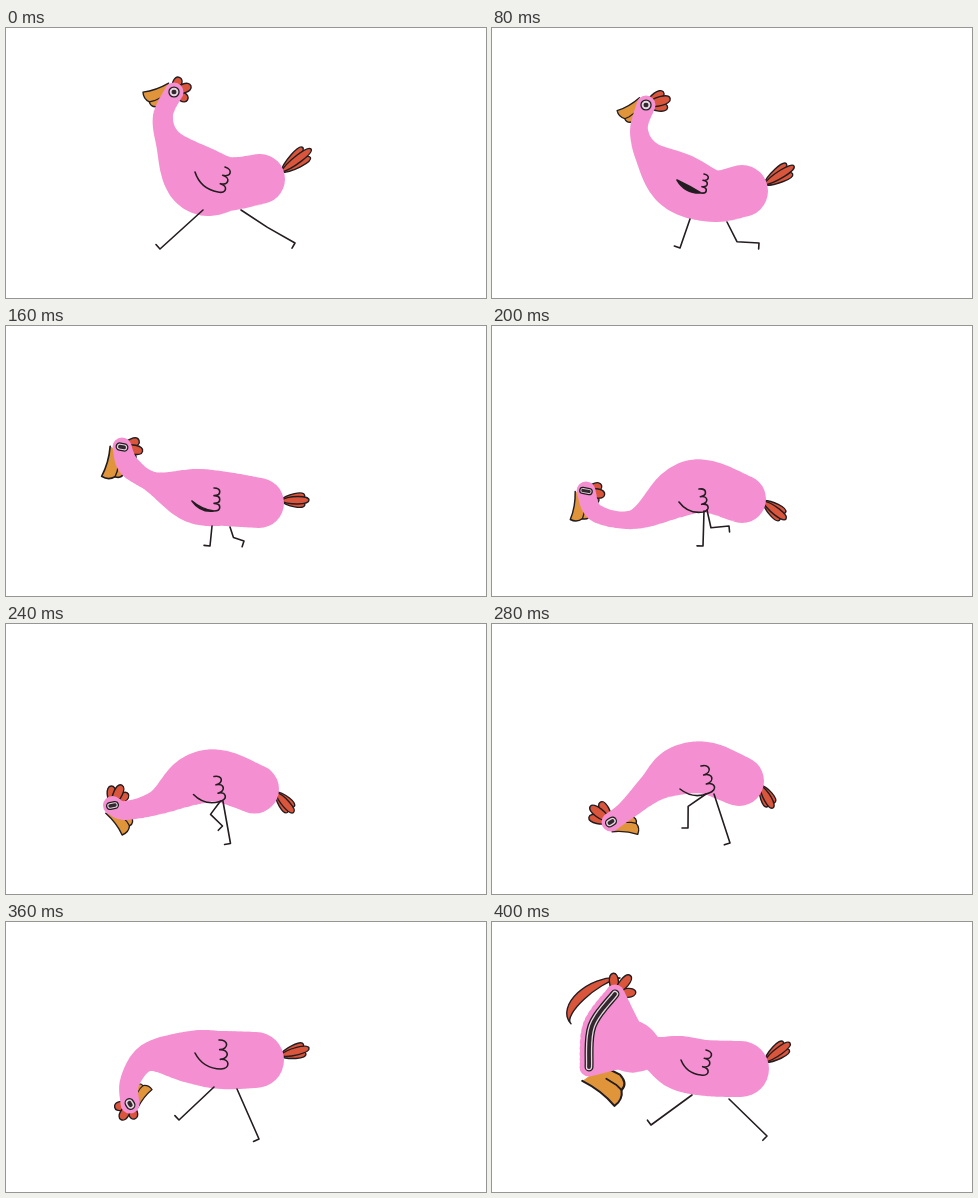
Recreate the animation shown at these times as an HTML page with a canvas. Size 480x270 px, loop 440 ms.

```html
<!DOCTYPE html>
<html lang="en">
<head>
<meta charset="utf-8">
<title>Running bird</title>
<style>
  html, body { margin: 0; width: 100%; height: 100%; overflow: hidden; background: #fff; }
  canvas { display: block; width: 100vw; height: 100vh; }
</style>
</head>
<body>
<canvas id="stage" width="480" height="270"></canvas>
<script>
const ctx = document.getElementById('stage').getContext('2d');
const STEP = 40, STEPS = 11, HEAD_RADIUS = 9.5;
const INK = '#231c20', PINK = '#f490d1', RED = '#d9553b', ORANGE = '#e0953b';

// Key poses of the rig, placed on a step of the cycle:
//   face  x, y of the head (a curve of points when it is smeared)
//   spine x, y, radius from neck to rump      beak  turn, size
//   comb  angle, length, spread               eye   squint, tilt
//   tail  x, y of the tip                     wing  start, bottom, top, blade
//   legs  hip, foot and knee bend, twice      (angles in degrees)
const keys = [
  { at: 0, face: [168, 64], spine: [157, 88, 10, 164, 115, 14, 193, 151, 33, 222, 156, 27, 254, 151, 25],
    beak: [2, 1], comb: [-20, 18, 50], eye: [0, 0], tail: [305, 121], wing: [189, 144, 212, 164, 219, 139, 0],
    legs: [197, 182, 154, 221, 0, 235, 182, 289, 215, 1] },
  { at: 2, face: [154, 77], spine: [147, 102, 9, 157, 127, 14, 187, 154, 29, 221, 168, 26, 250, 163, 26],
    beak: [13, 0.95], comb: [-15, 25, 22], eye: [0, 0], tail: [302, 138], wing: [185, 152, 209, 165, 212, 146, 5],
    legs: [198, 191, 188, 220, 0, 235, 194, 267, 215, 11] },
  { at: 4, face: [116, 121], spine: [123, 140, 11, 148, 157, 11, 189, 170, 27, 220, 173, 27, 253, 177, 25],
    beak: [57, 1.15], comb: [12, 21, 33], eye: [2, 10], tail: [303, 174], wing: [186, 175, 208, 185, 208, 162, 2],
    legs: [206, 200, 204, 220, 0, 224, 201, 238, 215, 5] },
  { at: 5, face: [94, 165], spine: [104, 187, 9, 143, 193, 10, 187, 166, 25, 213, 160, 26, 250, 173, 24],
    beak: [63, 1.05], comb: [12, 19, 32], eye: [3, 10], tail: [294, 193], wing: [187, 176, 211, 186, 207, 163, 0],
    legs: [212, 185, 211, 220, 0, 215, 184, 237, 200, 12] },
  { at: 7, face: [119, 198], spine: [135, 186, 10, 161, 163, 15, 186, 147, 24, 214, 144, 26, 247, 157, 25],
    beak: [157, 0.95], comb: [-143, 26, 25], eye: [1.5, -32], tail: [281, 184], wing: [188, 165, 217, 169, 209, 142, 0],
    legs: [222, 170, 238, 219, 0, 214, 170, 196, 204, 10] },
  { at: 9, face: [124, 182], spine: [124, 159, 10, 143, 135, 14, 185, 135, 26, 215, 138, 29, 250, 138, 28],
    beak: [215, 0.85], comb: [-240, 18, 48], eye: [1, 60], tail: [303, 126], wing: [189, 131, 215, 147, 213, 118, 0],
    legs: [231, 167, 253, 217, 0, 208, 165, 173, 198, 0] },
  { at: 10, face: [123, 72, 100, 104, 97, 145], spine: [133, 122, 24, 160, 131, 17, 188, 141, 27, 214, 146, 28, 249, 147, 28],
    beak: [125, 1.5], comb: [-50, 24, 45], eye: [0, 0], tail: [298, 121], wing: [189, 138, 209, 153, 214, 128, 0],
    legs: [237, 177, 275, 214, 0, 200, 173, 159, 203, 0] }
];

const rad = degrees => degrees * Math.PI / 180;
const mix = (a, b, k) => a.map((v, i) => v + (b[i] - v) * k);

function poseAt(step) {
  const next = keys.findIndex(key => key.at >= step);
  const b = keys[next];
  if (b.at === step) return b;
  const a = keys[next - 1], pose = {};
  for (const part in a) {
    if (part !== 'at') pose[part] = mix(a[part], b[part], (step - a.at) / (b.at - a.at));
  }
  return pose;
}

function groups(list, size) {
  return Array.from({ length: list.length / size }, (_, i) => list.slice(i * size, (i + 1) * size));
}

// Smooth curve through points of any dimension.
function curve(points, perSpan) {
  if (points.length < 2) return points;
  const at = i => points[Math.max(0, Math.min(points.length - 1, i))];
  const out = [];
  for (let n = 0; n <= (points.length - 1) * perSpan; n++) {
    const i = Math.min(points.length - 2, Math.floor(n / perSpan)), t = n / perSpan - i;
    const [a, b, c, d] = [at(i - 1), at(i), at(i + 1), at(i + 2)];
    out.push(b.map((v, k) => v + t / 2 * (c[k] - a[k] + t * (2 * a[k] - 5 * v + 4 * c[k] - d[k]
      + t * (3 * v - a[k] - 3 * c[k] + d[k])))));
  }
  return out;
}

function stroke(width, color = INK) {
  ctx.lineWidth = width;
  ctx.strokeStyle = color;
  ctx.stroke();
}

function line(points, width) {
  ctx.beginPath();
  points.forEach(p => ctx.lineTo(...p));
  stroke(width);
}

function fillInked(color) {
  ctx.fillStyle = color;
  ctx.fill();
  stroke(1.4);
}

function feather(x, y, angle, length, width, curl = 0) {
  ctx.save();
  ctx.translate(x, y);
  ctx.rotate(rad(angle));
  ctx.beginPath();
  ctx.moveTo(0, 0);
  ctx.bezierCurveTo(length * 0.3, curl - width, length, curl - width, length, 0);
  ctx.bezierCurveTo(length, curl + width, length * 0.3, curl + width, 0, 0);
  fillInked(RED);
  ctx.restore();
}

function plume(x, y, angle, length, spread, width) {
  for (const side of [-1, 1, 0]) {
    feather(x, y, angle + side * spread, length * (side ? 0.87 : 1), width);
  }
}

function drawTail([tipX, tipY], [x, y, radius]) {
  const lift = Math.atan2(tipY - y, tipX - x) * 0.4 - 0.09;
  const rootX = x + radius * 0.85 * Math.cos(lift), rootY = y + radius * 0.85 * Math.sin(lift);
  const dx = tipX - rootX, dy = tipY - rootY;
  plume(rootX, rootY, Math.atan2(dy, dx) * 180 / Math.PI, Math.hypot(dx, dy), 11, 5);
}

function drawBeak([x, y], [turn, size]) {
  ctx.save();
  ctx.translate(x, y);
  ctx.rotate(-rad(turn));
  ctx.scale(-size, -size);
  ctx.beginPath();
  ctx.moveTo(5, 9);
  ctx.quadraticCurveTo(18, 2, 31, 1);
  ctx.quadraticCurveTo(31, -6, 25, -9);
  ctx.quadraticCurveTo(24, -15, 16, -14);
  ctx.lineTo(5, -8);
  fillInked(ORANGE);
  line([[25, -9], [20, -8], [13, -5]], 1.2);
  ctx.restore();
}

// Sweep a circle of changing radius from every face point down to the rump.
function drawBody(face, spine) {
  ctx.beginPath();
  for (const p of face) {
    for (const [x, y, r] of curve([[...p, HEAD_RADIUS], ...spine], 18)) {
      ctx.moveTo(x + r, y);
      ctx.arc(x, y, r, 0, Math.PI * 2);
    }
  }
  ctx.fillStyle = PINK;
  ctx.fill();
}

function drawEye(face, [squint, tilt]) {
  const [x, y] = face[0], reach = squint + 0.2;
  const dx = reach * Math.cos(rad(tilt)), dy = reach * Math.sin(rad(tilt));
  const spine = face.length > 1 ? face : [[x - dx, y - dy], [x + dx, y + dy]];
  const width = (face.length > 1 ? 9 : 11) - squint * 1.2;
  line(spine, width);
  stroke(width - 2.6, '#e6d6e0');
  stroke(width * 0.42, '#33282e');
}

function drawWing(wing) {
  const [start, bottom, top] = groups(wing.slice(0, 6), 2), blade = wing[6];
  const dx = bottom[0] - start[0], dy = bottom[1] - start[1];
  const bend = [start[0] + dx * 0.5 - dy * 0.3, start[1] + dy * 0.5 + dx * 0.3];
  ctx.beginPath();
  ctx.moveTo(...start);
  ctx.quadraticCurveTo(...bend, ...bottom);
  if (blade) {
    ctx.quadraticCurveTo(bend[0] + blade, bend[1] - blade * 1.5, ...start);
    ctx.fillStyle = INK;
    ctx.fill();
    ctx.moveTo(...bottom);
  }
  const rise = [(top[0] - bottom[0]) / 3, (top[1] - bottom[1]) / 3];
  const out = [-rise[1], rise[0]];
  for (let i = 0; i < 3; i++) {
    const from = mix(bottom, top, i / 3), to = mix(bottom, top, (i + 1) / 3);
    ctx.bezierCurveTo(from[0] + out[0], from[1] + out[1], to[0] + out[0], to[1] + out[1], ...to);
  }
  stroke(1.6);
}

// The toe always stands at a right angle to the shin.
function drawLeg([hipX, hipY, footX, footY, bend]) {
  const dx = footX - hipX, dy = footY - hipY, k = bend / Math.hypot(dx, dy);
  const knee = [hipX + dx / 2 - dy * k, hipY + dy / 2 + dx * k];
  const shinX = footX - knee[0], shinY = footY - knee[1], toe = 6 / Math.hypot(shinX, shinY);
  line([[hipX, hipY], knee, [footX, footY], [footX - shinY * toe, footY + shinX * toe]], 1.6);
}

function drawBird(pose) {
  const face = curve(groups(pose.face, 2), 8), spine = groups(pose.spine, 3);
  const crown = face[0], [angle, length, spread] = pose.comb;
  ctx.fillStyle = '#fff';
  ctx.fillRect(0, 0, 480, 270);
  ctx.lineCap = ctx.lineJoin = 'round';
  drawTail(pose.tail, spine[spine.length - 1]);
  if (face.length > 1) feather(crown[0] + 5, crown[1] - 16, 137, 67, 6, 18);
  plume(...crown, angle, length, spread, 6);
  drawBeak(face[face.length - 1], pose.beak);
  drawBody(face, spine);
  drawEye(face, pose.eye);
  drawWing(pose.wing);
  groups(pose.legs, 5).forEach(drawLeg);
}

const began = performance.now();
function tick() {
  drawBird(poseAt(Math.floor((performance.now() - began) / STEP) % STEPS));
  requestAnimationFrame(tick);
}
tick();
</script>
</body>
</html>
```
